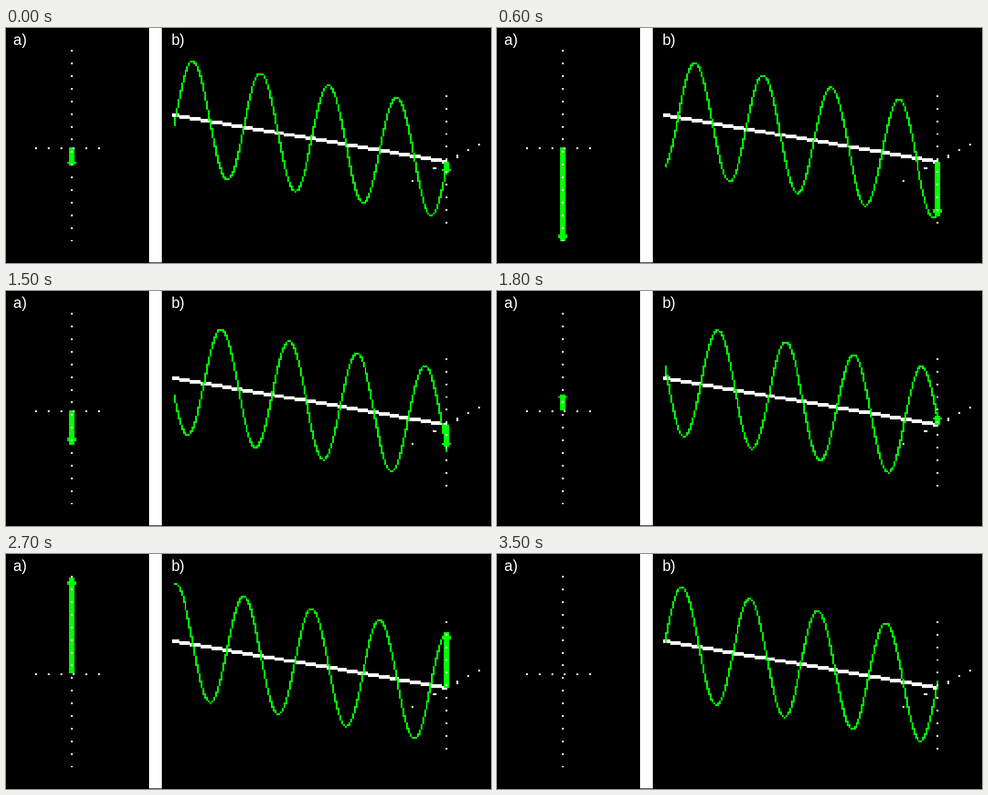
A matplotlib script for the animation above (3600 ms loop, 800 by 388 pixels).

```python
import math

import numpy as np
import matplotlib.pyplot as plt
from matplotlib.animation import FuncAnimation

W, H, DPI = 800, 388, 100
FRAMES, INTERVAL = 36, 100
CELL_X, CELL_Y = 2.97, 2.983   # size of one coarse pixel
WHITE, GREEN = (255, 255, 255), (0, 255, 0)

LEFT_COL, LEFT_ROW = 36, 66    # arrow origin in panel a
FIRST, LAST = 93, 244          # wave columns in panel b
RIGHT_ROW = 74                 # arrow origin row in panel b
SPAN = LAST - FIRST
PERIOD = SPAN / 4


def block(img, col, row, color, w=1, h=1):
    x0, x1 = math.ceil(col * CELL_X), math.ceil((col + w) * CELL_X)
    y0, y1 = math.ceil(row * CELL_Y), math.ceil((row + h) * CELL_Y)
    img[y0:y1, x0:x1] = color


def axes_dots(img):
    for row in range(12, 118, 7):
        block(img, LEFT_COL, row, WHITE)
    for col in range(16, 52, 7):
        block(img, col, LEFT_ROW, WHITE)
    for row in range(37, 108, 7):
        block(img, LAST, row, WHITE)


def depth_dots(img):
    for dc, row, w, h in [(-19, 84, 1, 1), (-7, 77, 2, 1), (6, 70, 1, 2),
                          (12, 67, 1, 1), (18, 64, 1, 1)]:
        block(img, LAST + dc, row, WHITE, w, h)


def axis_line(img):
    for col in range(FIRST - 1, LAST + 1):
        row = 47 + round(26 * (col - FIRST) / SPAN)
        block(img, col, row, WHITE, h=2)


def wave(img, phase):
    def height(col):
        shift = 2 * math.pi * (LAST - 0.3 - col) / PERIOD
        axis = 47 + 26.5 * (col - FIRST) / SPAN
        return axis + 31 * math.sin(phase + shift)

    for col in range(FIRST, LAST + 1):
        ys = [height(col + d) for d in (-0.5, 0, 0.5)]
        top = round(min(ys) + 0.25)
        bottom = max(top, round(max(ys) - 0.25))
        block(img, col, top, GREEN, h=bottom - top + 1)


def arrow(img, col, base, length):
    if length == 0:
        return
    sign = 1 if length > 0 else -1
    tip = base + length
    start = base if sign > 0 else base - 1
    top, bottom = min(start, tip), max(start, tip)
    block(img, col - 1, top, GREEN, 3, bottom - top + 1)
    for back in ((1,) if abs(length) < 12 else (2, 3)):
        block(img, col - 2, tip - sign * back, GREEN, 5)


def render(i):
    phase = 2 * math.pi * (i + 1) / FRAMES
    s = math.sin(phase)
    img = np.zeros((H, W, 3), np.uint8)
    img[:H - 1, 236:257] = WHITE
    depth_dots(img)
    axis_line(img)
    wave(img, phase)
    arrow(img, LEFT_COL, LEFT_ROW, min(round(54 * s), 53))
    arrow(img, LAST, RIGHT_ROW, round(31.2 * s))
    axes_dots(img)
    return img


fig = plt.figure(figsize=(W / DPI, H / DPI), dpi=DPI, facecolor="black")
ax = fig.add_axes([0, 0, 1, 1])
ax.set_axis_off()
picture = ax.imshow(render(0), extent=(0, W, H, 0), aspect="auto",
                    interpolation="nearest")
ax.set_xlim(0, W)
ax.set_ylim(H, 0)
for x, label in ((12, "a)"), (272.5, "b)")):
    ax.text(x, 28, label, color="white", family="Liberation Sans",
            fontsize=25 * 72 / DPI, va="baseline", ha="left")


def update(i):
    picture.set_data(render(i))
    return (picture,)


anim = FuncAnimation(fig, update, frames=FRAMES, interval=INTERVAL,
                     repeat=True, repeat_delay=0, blit=False)
plt.show()
```
